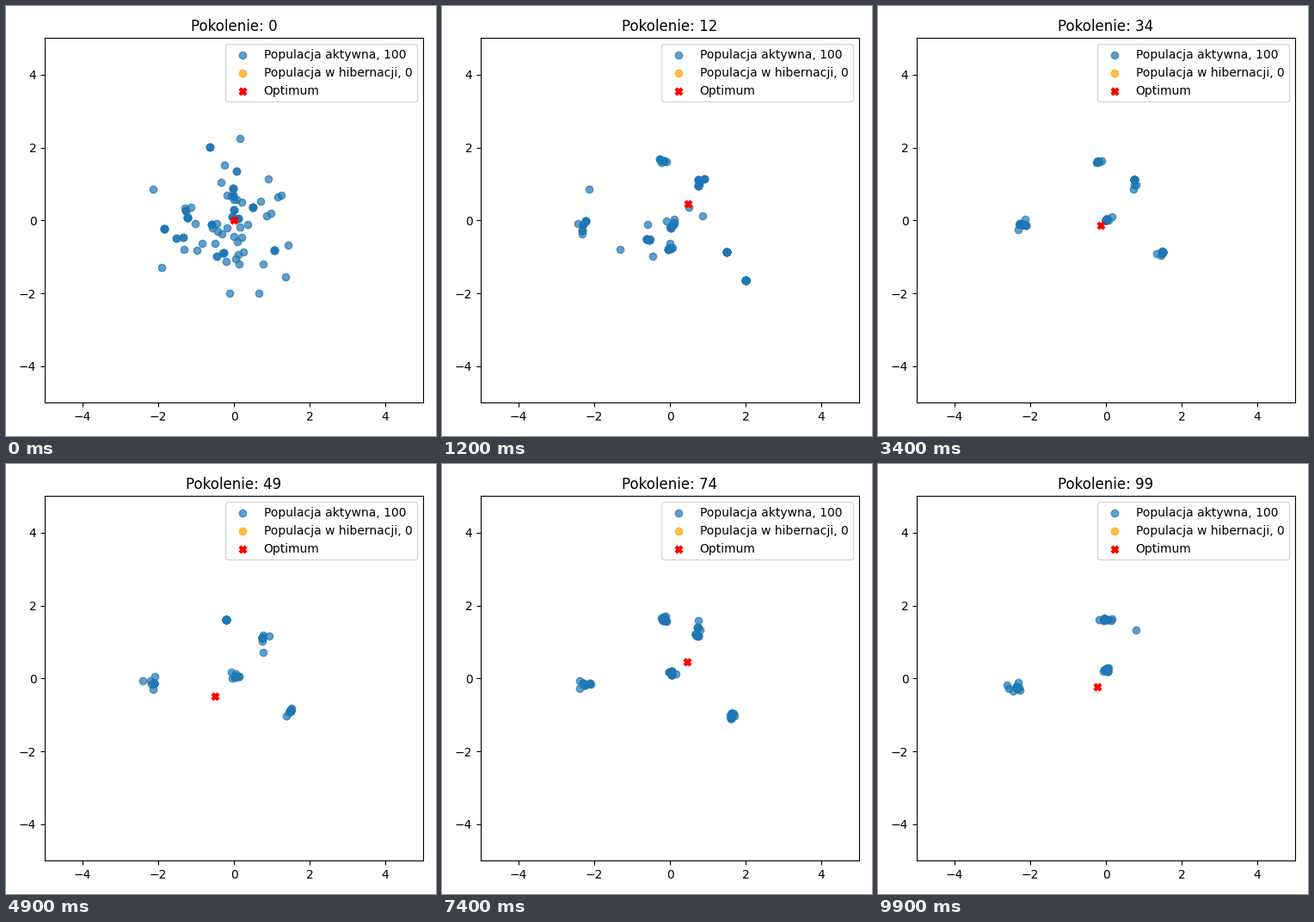
Recreate the animation shown at these times as a matplotlib script. Size 500 by 500 pixels, loop 10000 ms.

```python
import numpy as np
import matplotlib.pyplot as plt
from matplotlib.animation import FuncAnimation

GENS, SIZE = 100, 100
FOUNDERS, DOUBLED = 62, 25   # distinct starting points, how many have copies
RENEWAL, FRESH = .3, .2      # chance to be replaced, chance of a new point
rng = np.random.default_rng(7)

# centre at the start, middle and end; spread; last generation it survives
NICHES = [
    ([(-.20, 1.62), (-.22, 1.63), (0, 1.63)], (.10, .04), GENS),
    ([(.73, 1.09), (.72, 1.12), (.75, 1.40)], (.06, .16), 86),
    ([(-.02, -.18), (.06, .10), (.02, .26)], (.07, .08), GENS),
    ([(-2.20, -.24), (-2.15, -.07), (-2.45, -.28)], (.11, .15), GENS),
    ([(1.48, -.84), (1.50, -.90), (1.82, -1.20)], (.06, .07), 86),
    ([(-.58, -.50)] * 3, (.06, .10), 12),
    ([(0, -.77)] * 3, (.08, .06), 12),
    ([(2.0, -1.65)] * 3, (.01, .01), 12),
]


def centre(niche, g):
    path = np.array(NICHES[niche][0])
    times = np.linspace(0, GENS, len(path))
    return np.array([np.interp(g, times, axis) for axis in path.T])


def founders():
    pts = rng.normal(size=(2 * SIZE, 2))
    pts = pts[np.hypot(*pts.T) < 2.3][:FOUNDERS]
    copies = rng.integers(0, DOUBLED, SIZE - FOUNDERS)
    return np.vstack([pts, pts[copies]])


def evolve():
    """Individuals copy a well placed mate or take a new point nearby."""
    pos = np.empty((GENS, SIZE, 2))
    pos[0] = founders()
    home = np.arange(SIZE) % len(NICHES)
    for g in range(1, GENS):
        pos[g] = pos[g - 1]
        before = home.copy()
        alive = [k for k, niche in enumerate(NICHES) if niche[2] >= g]
        for i in np.flatnonzero(rng.random(SIZE) < RENEWAL):
            if home[i] not in alive:
                home[i] = rng.choice(alive)
            mid = centre(home[i], g)
            if rng.random() < FRESH:
                pos[g, i] = rng.normal(mid, NICHES[home[i]][1])
            else:
                mates = rng.choice(np.flatnonzero(before == home[i]), 3)
                options = pos[g - 1, mates]
                best = np.hypot(*(options - mid).T).argmin()
                pos[g, i] = options[best]
    return pos


positions = evolve()

fig, ax = plt.subplots(figsize=(5, 5), dpi=100)
active = ax.scatter(*positions[0].T, alpha=.7, color="tab:blue",
                    label=f"Populacja aktywna, {SIZE}")
ax.scatter([], [], alpha=.7, color="orange",
           label="Populacja w hibernacji, 0")
optimum = ax.scatter([0], [0], color="red", marker="X", label="Optimum")
ax.set(xlim=(-5, 5), ylim=(-5, 5))
title = ax.set_title("Pokolenie: 0")
ax.legend(loc="upper right")
fig.tight_layout()


def update(g):
    active.set_offsets(positions[g])
    shift = .5 * np.sin(.1 * g)
    optimum.set_offsets([[shift, shift]])
    title.set_text(f"Pokolenie: {g}")
    return active, optimum, title


anim = FuncAnimation(fig, update, frames=GENS, interval=100, repeat=True)
plt.show()
```
